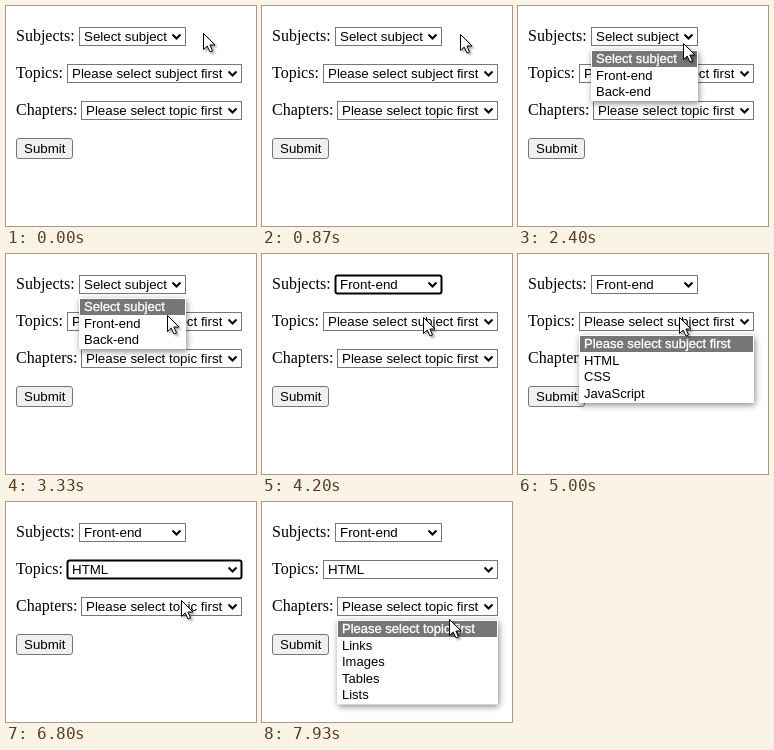
An HTML page that plays this animation: 250x220 px, repeating every 8 s.

```html
<!DOCTYPE html>
<html lang="en">
<head>
<meta charset="utf-8">
<title>Dependent dropdowns</title>
<style>
html, body { margin: 0; width: 100%; height: 100%; overflow: hidden; background: #fff; }
svg { display: block; }
text { font: 13.333px "Liberation Sans", Arial, sans-serif; white-space: pre; }
.label { font: 16px "Liberation Serif", "Times New Roman", serif; }
.option { font-size: 13px; }
.active { fill: #fff; stroke: #fff; stroke-width: .35px; }
.popup { filter: drop-shadow(1px 2px 3px #0007); }
.cursor { filter: drop-shadow(2px 2px 1px #0005); }
</style>
</head>
<body>
<svg id="stage" width="250" height="220" viewBox="0 0 250 220"></svg>
<script>
const LOOP = 8000, STEP = 200 / 3, ROW = 16.5, HOVER = 300;
const stage = document.getElementById('stage');

// The popup shows from open to close; the second option is then chosen
const fields = [
  { label: 'Subjects:', x: 73, right: 180, open: 1660, close: 3930,
    options: ['Select subject', 'Front-end', 'Back-end'] },
  { label: 'Topics:', x: 61, right: 236, open: 4930, close: 6530,
    options: ['Please select subject first', 'HTML', 'CSS', 'JavaScript'] },
  { label: 'Chapters:', x: 75, right: 236, open: 7330, close: Infinity,
    options: ['Please select topic first', 'Links', 'Images', 'Tables', 'Lists'] }
];
fields.forEach((f, i) => {
  f.y = 21 + 37 * i;
  f.blur = fields[i + 1]?.open;
});

// Pointer moves, each from wherever the last one ended
const home = { x: 197, y: 27 };
const moves = [
  { from: 130, to: 500, x: 208, y: 29 },
  { from: 500, to: 870, x: 198, y: 28 },
  { from: 1070, to: 1600, x: 166, y: 28 },
  { from: 1930, to: 3330, x: 161, y: 61 },
  { from: 3330, to: 3930, x: 161, y: 63 },
  { from: 5270, to: 5800, x: 173, y: 97 },
  { from: 6200, to: 6800, x: 175, y: 98 },
  { from: 7070, to: 7900, x: 187, y: 117 }
];

function pointerAt(t) {
  let { x, y } = home;
  for (const m of moves) {
    const k = Math.min(1, Math.max(0, (t - m.from) / (m.to - m.from)));
    const ease = k * k * (3 - 2 * k);
    x += (m.x - x) * ease;
    y += (m.y - y) * ease;
  }
  return [Math.round(x), Math.round(y)];
}

const text = (x, y, s, cls = '') => `<text x="${x}" y="${y}" class="${cls}">${s}</text>`;

const box = (x, y, w, h, fill, extra = '') =>
  `<rect x="${x}" y="${y}" width="${w}" height="${h}" fill="${fill}" ${extra}/>`;

function select(f, t) {
  const { x, y, right } = f;
  const chosen = t >= f.close;
  const border = chosen && t < f.blur ? 'stroke="#000" stroke-width="2" rx="2"' : 'stroke="#767676"';
  return text(10, y + 14, f.label, 'label') +
    box(x + .5, y + .5, right - x - 1, 18, '#fff', border) +
    text(x + 5, y + 14, f.options[chosen ? 1 : 0]) +
    `<path d="M${right - 13.5} ${y + 7.5}l4 4 4-4" fill="none" stroke="#000" stroke-width="2"/>`;
}

function popup(f, t) {
  if (t < f.open || t >= f.close) return '';
  const { x, options } = f, top = f.y + 23, w = f.right - x;
  const active = t >= f.close - HOVER ? 1 : 0;
  return box(x, top, w, options.length * ROW + 2, '#fff', 'class="popup"') +
    box(x + 1, Math.round(top + 1 + active * ROW), w - 2, 16, '#767676') +
    options.map((s, i) => text(x + 5, Math.round(top + 13.2 + i * ROW), s,
      i === active ? 'option active' : 'option')).join('');
}

function draw(t) {
  const [px, py] = pointerAt(t);
  stage.innerHTML =
    fields.map(f => select(f, t)).join('') +
    box(10.5, 132.5, 56, 20, '#efefef', 'stroke="#767676" rx="2.5"') +
    text(18, 147, 'Submit') +
    fields.map(f => popup(f, t)).join('') +
    `<path class="cursor" transform="translate(${px + .5} ${py + .5})" fill="#fff" stroke="#000"
      d="M0 0V16L3.7 12.6 6.5 18.5 9 17.4 6.4 11.5H11.5Z"/>`;
}

let last = -1;
const start = performance.now();
function tick() {
  const t = (performance.now() - start) % LOOP;
  const step = Math.floor((t + 4) / STEP) % (LOOP / STEP);
  if (step !== last) draw(step * STEP);
  last = step;
  requestAnimationFrame(tick);
}
tick();
</script>
</body>
</html>
```
